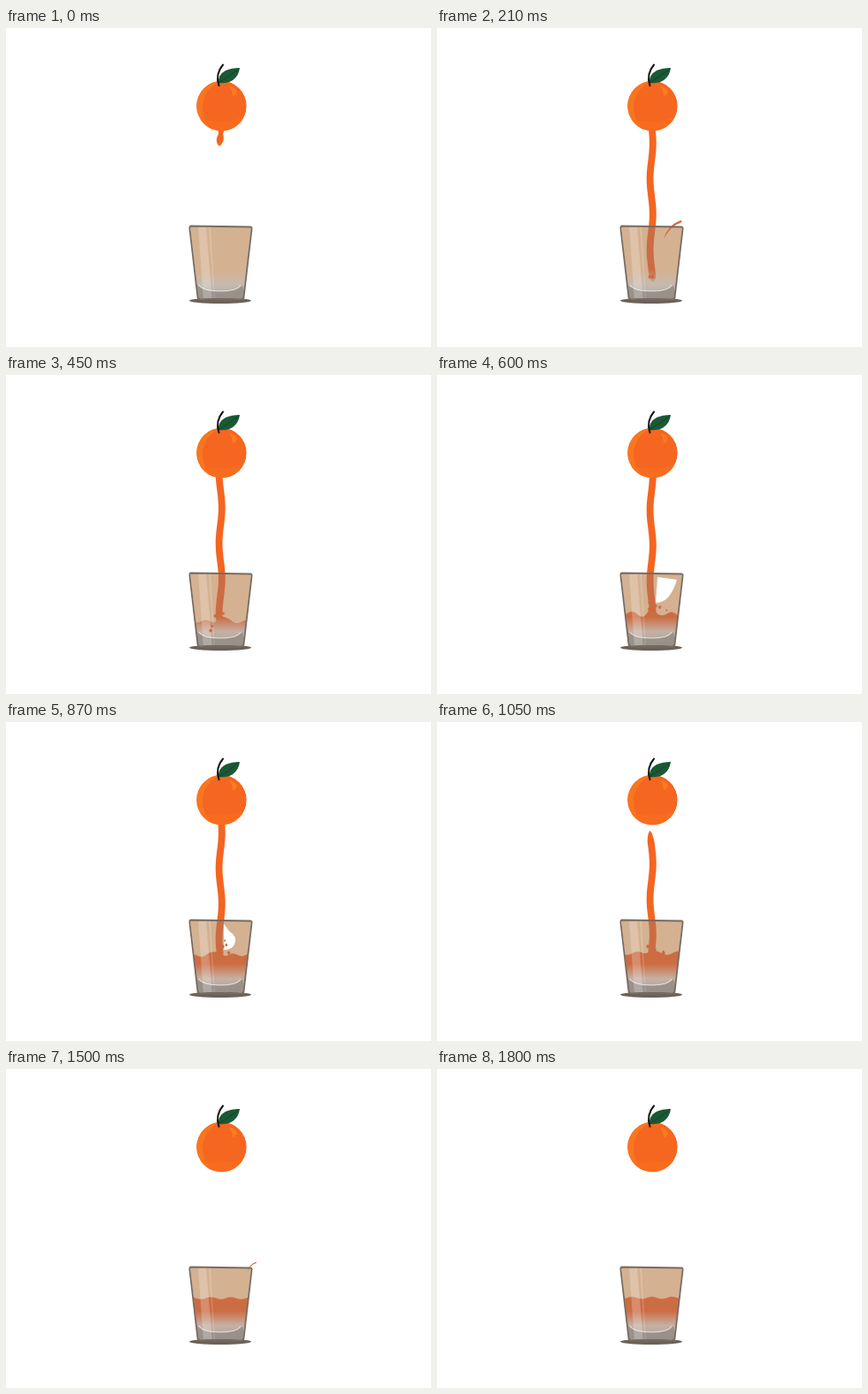
These frames come from a looping animation (480 by 360 pixels, 1920 ms). An HTML page:

```html
<!DOCTYPE html>
<html lang="en">
<head>
<meta charset="utf-8">
<title>Fresh juice</title>
<style>
  html, body { margin: 0; width: 100%; height: 100%; overflow: hidden; background: #fff; }
  svg { display: block; width: 100vw; height: 100vh; }
</style>
</head>
<body>
<svg viewBox="0 0 480 360">
  <defs>
    <linearGradient id="mist" gradientUnits="userSpaceOnUse" x1="0" y1="273" x2="0" y2="306">
      <stop offset="0" stop-color="#c4bcb4" stop-opacity="0"/>
      <stop offset=".5" stop-color="#c4bcb4" stop-opacity=".85"/>
      <stop offset="1" stop-color="#a8a199"/>
    </linearGradient>
    <clipPath id="inside"><path d="M208 224L277 225L268 305H217Z"/></clipPath>
    <clipPath id="skin"><circle cx="243.5" cy="88" r="28.3"/></clipPath>
    <path id="stream"/>
  </defs>

  <ellipse cx="242" cy="307.8" rx="35" ry="3.1" fill="#6b6158"/>
  <g fill="#f46520">
    <use href="#stream"/>
    <path id="drip"/>
  </g>

  <g clip-path="url(#inside)">
    <path d="M200 220H285V310H200Z" fill="#fff"/>
    <g fill="#eb523c">
      <use href="#stream"/>
      <path id="liquid"/>
    </g>
    <path d="M200 220H285V310H200Z" fill="#b77d46" fill-opacity=".6"/>
    <path d="M200 262H285V310H200Z" fill="url(#mist)"/>
    <path d="M216 290Q222 297 242 297T267 290L272 310H212Z" fill="#948e86" fill-opacity=".85"/>
    <path d="M217 224H226L233 308H223Z" fill="#fff" fill-opacity=".22"/>
    <path d="M229 224H231L236 308H235Z" fill="#fff" fill-opacity=".18"/>
  </g>
  <path d="M218 290Q222 297 242 297T265 290" fill="none" stroke="#fff" stroke-opacity=".7"/>
  <path id="gap" fill="#fff"/>
  <g id="drops" fill="#cc6a3e"></g>
  <path id="streak" d="M256 238Q260 223 275 217L277 218L275 220Q265 222 256 238Z" fill="#d96b3a"/>
  <path d="M209 223.500L276 224.500Q278 224.500 277.500 227L268.500 304Q268 306.500 265 306.500H220Q217 306.500 216.500 304L207.500 227Q207 223.500 209 223.500Z"
        fill="none" stroke="#776b61" stroke-width="1.8"/>

  <g clip-path="url(#skin)">
    <circle cx="243.500" cy="88" r="28.300" fill="#f56620"/>
    <path d="M244 59Q223 69 222 88Q222 107 236 117H212V59Z" fill="#f9761f"/>
    <path d="M217 102Q242 110 271 100L267 118H220Z" fill="#f8701f" fill-opacity=".6"/>
    <path d="M252 66Q259 67 261 72Q259 77 256 77Q256 71 252 66Z" fill="#f97d20"/>
  </g>
  <path d="M240 62Q239 53 248 48Q255 45 264 45Q263 54 256 59Q249 63 240 62Z" fill="#1b5936"/>
  <path d="M241 61Q250 56 263 46" fill="none" stroke="#0d4023" stroke-width=".8"/>
  <path d="M240.500 65Q236 52 245 41.500" fill="none" stroke="#111" stroke-width="2" stroke-linecap="round"/>
</svg>

<script>
const LOOP = 1920, STEP = 30, SPOUT = 113, FLOOR = 287;
const FIRST_HIT = 150, DETACH = 1020, DRIP_FALL = 1260, DRIP_HIT = 1470;

const el = id => document.getElementById(id);
const clamp = v => Math.min(1, Math.max(0, v));
const bump = (v, width) => Math.exp(-((v / width) ** 2));
const polygon = points => "M" + points.map(p => p.map(v => v.toFixed(2)).join(" ")).join("L") + "Z";

// Seeded noise in 0..1
const noise = n => {
  const v = Math.sin(n * 127.1 + 3.7) * 43758.5453;
  return v - Math.floor(v);
};

const surface = t => Math.min(296, 258 + 44 * Math.exp((210 - t) / 300));

// Waves travel up the stream
const sway = (y, t) => 242.2 + 1.6 * Math.cos(Math.PI / 40 * (y - 262.5 + t / 4));

function streamPath(t) {
  const tip = Math.min(FLOOR, 133 + .0068 * t * t, surface(t) + 4);
  const loose = Math.max(0, t - DETACH);
  const top = SPOUT + .0105 * loose * loose;
  if (tip - top < 1) return "";
  const left = [], right = [];
  for (let n = 0, count = 48; n <= count; n++) {
    const y = top + (tip - top) * n / count;
    let half = 3.9 * Math.sqrt(clamp((tip - y) / 6));
    if (loose) half *= Math.sqrt(clamp((y - top) / 12));
    if (t < 90) half *= 1 - .35 * bump(y - 119, 3);
    const x = sway(y, t);
    left.push([x - half, y]);
    right.unshift([x + half, y]);
  }
  return polygon(left.concat(right));
}

function liquidPath(t) {
  if (t <= 210) return "";
  const pour = 1 - clamp((t - 900) / 300), points = [];
  for (let x = 206; x <= 280; x += 2) {
    const wave = Math.sin(x / 3.6 + t / 95) * (1.2 + pour) + Math.sin(x / 6.3 - t / 130) * pour;
    points.push([x, surface(t) + wave - 5 * pour * bump(x - 241.5, 5)]);
  }
  return polygon(points.concat([[280, 299], [206, 299]]));
}

function dripPath(t) {
  if (t < 1140 || t > DRIP_HIT) return "";
  const hang = clamp((t - 1140) / 120), fall = Math.max(0, t - DRIP_FALL);
  const neck = 116 + 6 * hang * (1 - clamp(fall / 120));
  const y = 117 + 8.5 * hang + .0029 * fall * fall;
  return `M233 113H254Q249 116 244.500 117V${neck}H242.200V117Q238 116 233 113Z`
    + `M241.700 ${y}a1.700 2.300 0 1 0 3.400 0a1.700 2.300 0 1 0 -3.400 0Z`;
}

// Clear patch behind the splash, narrowing as the glass fills
function gapPath(t) {
  if (t < 570 || t > 930) return "";
  const p = clamp((t - 600) / 270);
  return `M${249 - 3 * p} 228L${271 - 19 * p} ${231 + 5 * p}`
    + `Q${268 - 6 * p} 242 ${261 - 3 * p} 251Q255 257 ${247 - p} 257Z`;
}

// Small drops leap from the surface while the juice pours
function dropMarkup(t) {
  let markup = "";
  for (let n = 0; n < 34; n++) {
    const launch = FIRST_HIT + n * 24, age = t - launch;
    if (age < 0 || age > 180) continue;
    const x = 243 + (noise(n) - .4) * .17 * age;
    const y = Math.min(FLOOR, surface(launch)) - 3 - (.12 + .16 * noise(n + 50)) * age + .0011 * age * age;
    const r = .9 + noise(n + 90);
    markup += `<ellipse cx="${x}" cy="${y}" rx="${r}" ry="${r * 1.2}"/>`;
  }
  return markup;
}

// A streak hops over the rim after the first juice and after the last drip
function drawStreak(t) {
  const last = t >= DRIP_HIT, age = t - (last ? DRIP_HIT : 210);
  const size = last ? .5 : 1 - Math.max(0, age) / 180;
  const streak = el("streak");
  streak.setAttribute("visibility", age >= -30 && age <= 90 ? "visible" : "hidden");
  streak.setAttribute("transform",
    `translate(${276 + age * .22} ${218 - age * .03 + .0012 * age * age}) scale(${size}) translate(-276 -218)`);
}

// The picture moves in steps and rests near the end of the loop
function stepped(time) {
  const t = Math.floor(time % LOOP / STEP) * STEP;
  return t < 1560 ? t : 1560 + 120 * Math.floor((t - 1560) / 120);
}

function draw(time) {
  const t = stepped(time);
  const shapes = { stream: streamPath, liquid: liquidPath, drip: dripPath, gap: gapPath };
  for (const id in shapes) el(id).setAttribute("d", shapes[id](t));
  el("drops").innerHTML = dropMarkup(t);
  drawStreak(t);
}

const start = performance.now();
function tick() {
  draw(performance.now() - start);
  requestAnimationFrame(tick);
}
tick();
</script>
</body>
</html>
```
